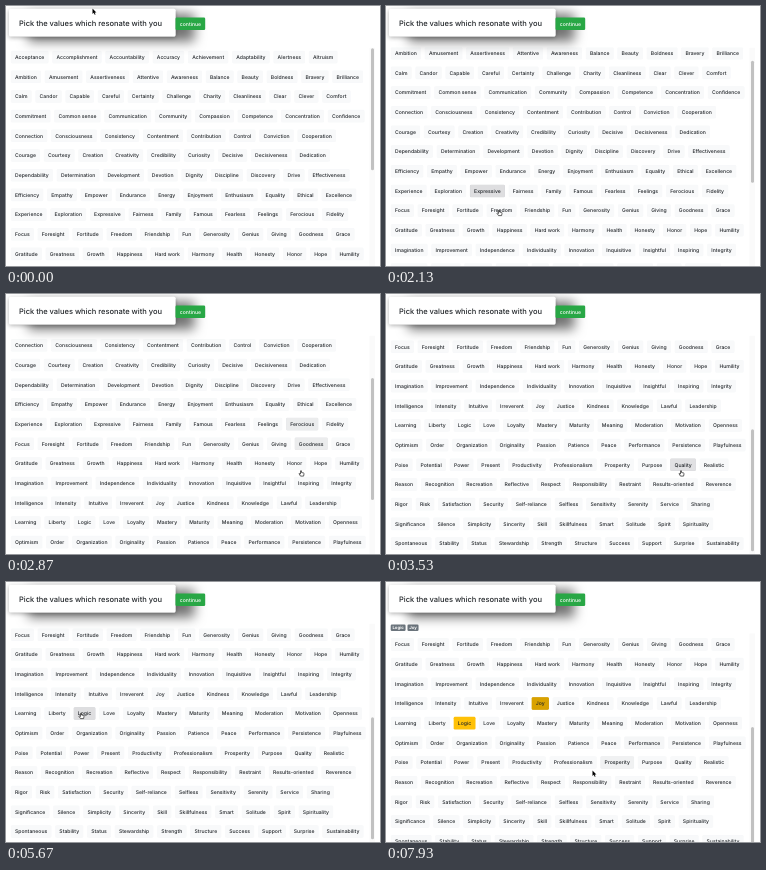
Animation of 374 by 260 pixels, one loop 8 s. Source, as an HTML page with a canvas:

```html
<!DOCTYPE html>
<html lang="en">
<head>
<meta charset="utf-8">
<title>Pick your values</title>
<style>
html, body { margin: 0; width: 100%; height: 100%; overflow: hidden; background: #fff; }
canvas { display: block; width: 374px; height: 260px; }
</style>
</head>
<body>
<canvas id="stage"></canvas>
<script>
const W = 374, H = 260, LOOP = 8000;
const canvas = document.getElementById('stage');
const ctx = canvas.getContext('2d');
const dpr = window.devicePixelRatio || 1;
canvas.width = W * dpr;
canvas.height = H * dpr;
ctx.textRendering = 'geometricPrecision';

const FONT = 'Inter, "Liberation Sans", sans-serif';
const SIZE = 5.11, GAP = 12.1, PAD = 4.2, CHIP_H = 12.6;
const LEFT = 9, FIRST_ROW = 51.1, PITCH = 19.68, LIST_TOP = 41.5;
const TAG_ROOM = 9.7, FADE = 150, HOVER_STEP = 200;

const ROWS = `Acceptance,Accomplishment,Accountability,Accuracy,Achievement,Adaptability,Alertness,Altruism
Ambition,Amusement,Assertiveness,Attentive,Awareness,Balance,Beauty,Boldness,Bravery,Brilliance
Calm,Candor,Capable,Careful,Certainty,Challenge,Charity,Cleanliness,Clear,Clever,Comfort
Commitment,Common sense,Communication,Community,Compassion,Competence,Concentration,Confidence
Connection,Consciousness,Consistency,Contentment,Contribution,Control,Conviction,Cooperation
Courage,Courtesy,Creation,Creativity,Credibility,Curiosity,Decisive,Decisiveness,Dedication
Dependability,Determination,Development,Devotion,Dignity,Discipline,Discovery,Drive,Effectiveness
Efficiency,Empathy,Empower,Endurance,Energy,Enjoyment,Enthusiasm,Equality,Ethical,Excellence
Experience,Exploration,Expressive,Fairness,Family,Famous,Fearless,Feelings,Ferocious,Fidelity
Focus,Foresight,Fortitude,Freedom,Friendship,Fun,Generosity,Genius,Giving,Goodness,Grace
Gratitude,Greatness,Growth,Happiness,Hard work,Harmony,Health,Honesty,Honor,Hope,Humility
Imagination,Improvement,Independence,Individuality,Innovation,Inquisitive,Insightful,Inspiring,Integrity
Intelligence,Intensity,Intuitive,Irreverent,Joy,Justice,Kindness,Knowledge,Lawful,Leadership
Learning,Liberty,Logic,Love,Loyalty,Mastery,Maturity,Meaning,Moderation,Motivation,Openness
Optimism,Order,Organization,Originality,Passion,Patience,Peace,Performance,Persistence,Playfulness
Poise,Potential,Power,Present,Productivity,Professionalism,Prosperity,Purpose,Quality,Realistic
Reason,Recognition,Recreation,Reflective,Respect,Responsibility,Restraint,Results-oriented,Reverence
Rigor,Risk,Satisfaction,Security,Self-reliance,Selfless,Sensitivity,Serenity,Service,Sharing
Significance,Silence,Simplicity,Sincerity,Skill,Skillfulness,Smart,Solitude,Spirit,Spirituality
Spontaneous,Stability,Status,Stewardship,Strength,Structure,Success,Support,Surprise,Sustainability`
  .split('\n').map(row => row.split(','));

const PICKS = [{ name: 'Logic', at: 5770 }, { name: 'Joy', at: 6860 }];

function ease(t, from, to) {
  const u = Math.min(1, Math.max(0, (t - from) / (to - from)));
  return u * u * (3 - 2 * u);
}

// Each flick of the wheel adds its own eased distance.
function scrollAt(t) {
  return 1.6 * ease(t, 1600, 1700) + 25.4 * ease(t, 1900, 2200)
    + 119 * ease(t, 2680, 3100) + 29.5 * ease(t, 2950, 3530);
}

const MOVES = [
  { from: 40, to: 620, x: 24, y: 60 },
  { from: 1240, to: 1600, x: 113, y: 204 },
  { from: 2200, to: 2550, x: 295, y: 176.5 },
  { from: 3650, to: 3900, x: 225, y: 14 },
  { from: 3900, to: 4530, x: 62, y: 250 },
  { from: 4570, to: 4900, x: 92, y: 229 },
  { from: 4900, to: 5400, x: 60, y: 110 },
  { from: 5400, to: 5540, x: 75, y: 131 },
  { from: 5780, to: 6330, x: 168, y: 122 },
  { from: 6440, to: 6600, x: 155, y: 122 },
  { from: 6900, to: 7650, x: 311, y: 148 },
  { from: 7690, to: 7920, x: 206.5, y: 188.5 }
];

function pointerAt(t) {
  let x = 86.5, y = 2.5;
  for (const m of MOVES) {
    const u = ease(t, m.from, m.to);
    x += (m.x - x) * u;
    y += (m.y - y) * u;
  }
  return { x, y };
}

// Type is set large and scaled down so advances stay fractional.
function setFont(weight) {
  ctx.font = `${weight} 100px ${FONT}`;
}

function textWidth(str, size, weight = 500) {
  setFont(weight);
  return ctx.measureText(str).width * size / 100;
}

function drawText(str, x, y, size, color, weight = 500) {
  ctx.save();
  ctx.translate(x, y);
  ctx.scale(size / 100, size / 100);
  setFont(weight);
  ctx.fillStyle = color;
  ctx.fillText(str, 0, 0);
  ctx.restore();
}

function box(x, y, w, h, r, color) {
  ctx.beginPath();
  ctx.roundRect(x, y, w, h, r);
  ctx.fillStyle = color;
  ctx.fill();
}

function borderedBox(x, y, w, h, fill, edge) {
  box(x, y, w, h, 1.3, edge);
  box(x + 0.33, y + 0.33, w - 0.66, h - 0.66, 1, fill);
}

const chips = ROWS.flatMap((row, r) => {
  let x = LEFT;
  return row.map(name => {
    const w = textWidth(name, SIZE);
    const chip = { name, x: x - PAD, w: w + 2 * PAD, y: FIRST_ROW + r * PITCH };
    x += w + GAP;
    return chip;
  });
});

const shiftAt = t => t >= PICKS[0].at ? TAG_ROOM : 0;

// Hover is refreshed only now and then while the list scrolls.
function hoverAt(t) {
  const { x, y } = pointerAt(t);
  const shift = shiftAt(t);
  if (y < LIST_TOP + shift) return null;
  const row = y - shift + scrollAt(Math.floor(t / HOVER_STEP) * HOVER_STEP);
  return chips.find(c => x >= c.x && x <= c.x + c.w && Math.abs(row - c.y) <= CHIP_H / 2);
}

function hoverLevels(t) {
  const levels = new Map(), n = 10;
  for (let k = 0; k < n; k++) {
    const chip = hoverAt(Math.max(0, t - k * FADE / n));
    if (chip) levels.set(chip, (levels.get(chip) || 0) + 1 / n);
  }
  return levels;
}

function mix(from, to, u) {
  return `rgb(${from.map((v, i) => Math.round(v + (to[i] - v) * u))})`;
}

const CHIP = [248, 249, 250], HOVER = [222, 222, 224], HOVER_EDGE = [212, 213, 216];

function drawChip(chip, y, level, picked) {
  const pick = picked.findIndex(p => p.name === chip.name);
  let fill = mix(CHIP, HOVER, level);
  let edge = mix(CHIP, HOVER_EDGE, level);
  if (pick >= 0) {
    const focused = pick === picked.length - 1;
    fill = focused ? '#d9a200' : '#ffc107';
    edge = focused ? '#cf9b00' : '#ffc107';
  }
  borderedBox(chip.x, y - CHIP_H / 2, chip.w, CHIP_H, fill, edge);
  drawText(chip.name, chip.x + PAD, y + 1.85, SIZE, '#212529');
}

function drawList(t, picked) {
  const scroll = scrollAt(t), shift = shiftAt(t), top = LIST_TOP + shift;
  const levels = hoverLevels(t);
  ctx.save();
  ctx.beginPath();
  ctx.rect(0, top, W, H - top);
  ctx.clip();
  for (const chip of chips) {
    const y = chip.y - scroll + shift;
    if (y > top - 10 && y < H + 10) drawChip(chip, y, levels.get(chip) || 0, picked);
  }
  box(363.5, top, 5.6, H, 0, '#fafafa');
  box(365, top + 0.8 + scroll * 0.53, 3, 122, 1.5, '#c1c1c1');
  ctx.restore();
}

function drawTags(picked) {
  let x = 4.7;
  for (const { name } of picked) {
    const w = textWidth(name, 4.3, 700) + 3.4;
    box(x, 42.6, w, 6.4, 1.2, '#6c757d');
    drawText(name, x + 1.7, 47.3, 4.3, '#fff', 700);
    x += w + 1.9;
  }
}

function drawPanel(dx, dy, blur, alpha) {
  ctx.save();
  ctx.shadowColor = `rgba(0,0,0,${alpha})`;
  ctx.shadowBlur = blur * dpr;
  ctx.shadowOffsetX = dx * dpr;
  ctx.shadowOffsetY = dy * dpr;
  box(3, 2.8, 166.5, 27.7, 1.5, '#fff');
  ctx.restore();
}

function drawHeader() {
  drawPanel(19, 5, 12, 0.55);
  drawPanel(0, 1.3, 4, 0.3);
  drawText('Pick the values which resonate with you', 13, 19.7, 7.48, '#212529');
  box(169.5, 11.5, 29.7, 12.5, 1.3, '#28a745');
  drawText('continue', 173.8, 19.5, SIZE, '#fff');
}

const ARROW = new Path2D('M0 0V5.4L1.3 4.3L2.2 6.3L3.1 5.9L2.2 4H3.9Z');
const HAND = new Path2D('M-.5 .3Q0-.4 .5 .3V2L2.7 2.5Q3.2 2.7 3 3.4L2.6 5.6H-.5L-2 3.3Q-1.9 2.6-1 3.1L-.5 3.5Z');

function drawPointer(t) {
  const { x, y } = pointerAt(t);
  const hand = hoverAt(t);
  const shape = hand ? HAND : ARROW;
  ctx.save();
  ctx.translate(x, y);
  ctx.lineJoin = 'round';
  ctx.lineWidth = 0.7;
  ctx.strokeStyle = hand ? '#222' : '#fff';
  ctx.fillStyle = hand ? '#fff' : '#000';
  if (hand) ctx.fill(shape);
  ctx.stroke(shape);
  if (!hand) ctx.fill(shape);
  ctx.restore();
}

function frame() {
  const t = performance.now() % LOOP;
  const picked = PICKS.filter(p => t >= p.at);
  ctx.setTransform(dpr, 0, 0, dpr, 0, 0);
  ctx.fillStyle = '#fff';
  ctx.fillRect(0, 0, W, H);
  drawList(t, picked);
  drawTags(picked);
  drawHeader();
  drawPointer(t);
  requestAnimationFrame(frame);
}
frame();
</script>
</body>
</html>
```
